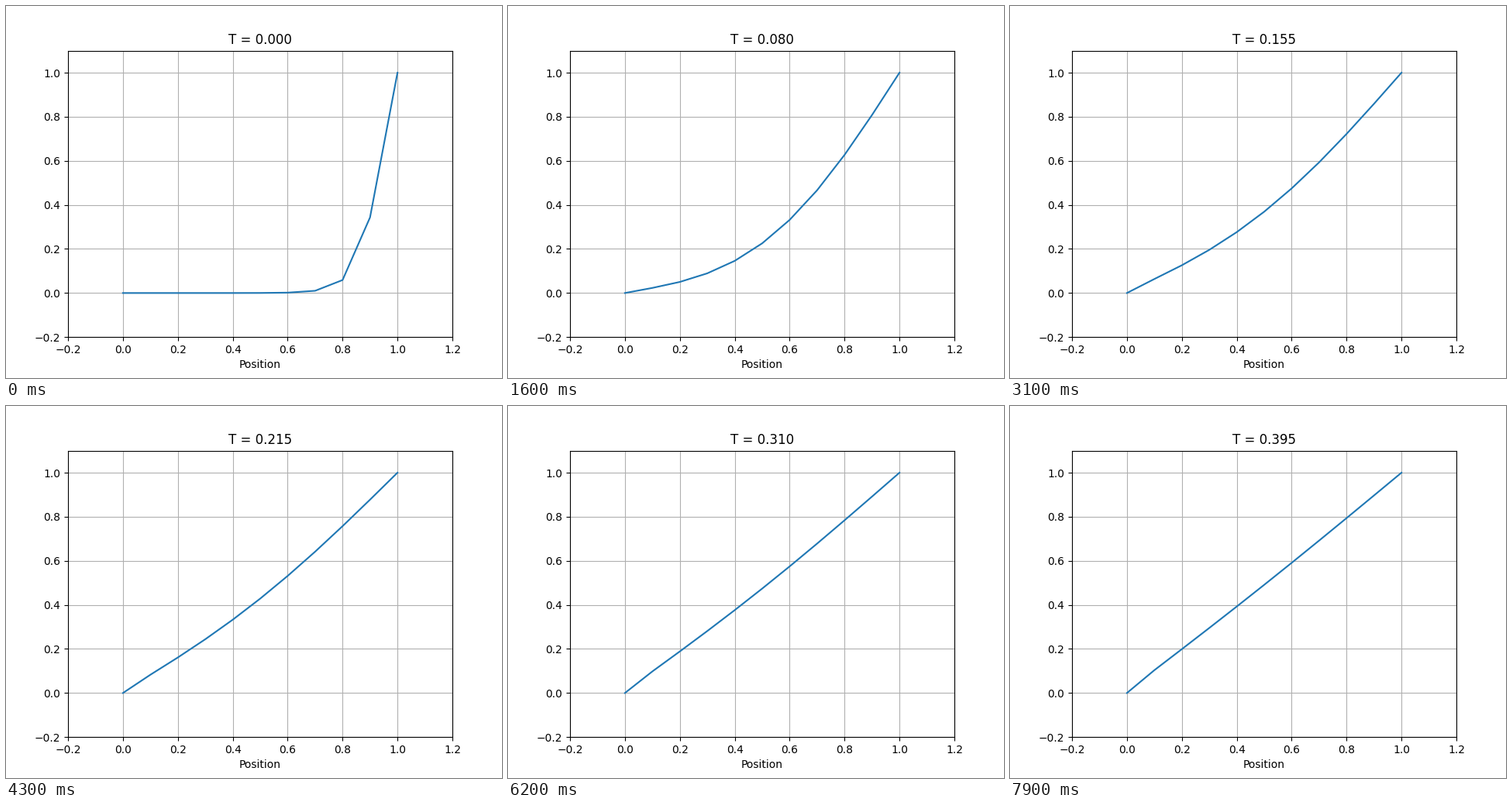
A matplotlib script that plays this animation: 640 px wide and 480 px high, repeating every 8000 ms.

```python
import numpy as np
import matplotlib.pyplot as plt
from matplotlib.animation import FuncAnimation

FRAMES, INTERVAL = 80, 100
DX, DT = 0.1, 0.005
R = DT / DX**2

x = np.linspace(0, 1, 11)
n = len(x)


def tridiag(side, mid):
    return mid * np.eye(n) + side * (np.eye(n, k=1) + np.eye(n, k=-1))


# Crank-Nicolson; only the right end is pinned inside the matrix
implicit = tridiag(-R / 2, 1 + R)
explicit = tridiag(R / 2, 1 - R)
implicit[-1] = np.eye(n)[-1]


def step(u):
    rhs = explicit @ u
    rhs[0], rhs[-1] = 0, 1
    new = np.linalg.solve(implicit, rhs)
    new[0], new[-1] = 0, 1
    return new


def solve():
    u = np.zeros(n)
    u[-1] = 1
    states = []
    for _ in range(FRAMES):
        u = step(u)
        states.append(u)
    return states


states = solve()

fig, ax = plt.subplots(figsize=(6.4, 4.8), dpi=100)
ax.set_xlim(-0.2, 1.2)
ax.set_ylim(-0.2, 1.1)
ax.set_xlabel("Position")
ax.grid(True)
line, = ax.plot(x, states[0])
title = ax.set_title("T = 0.000")


def update(i):
    line.set_ydata(states[i])
    title.set_text(f"T = {i * DT:.3f}")
    return line, title


anim = FuncAnimation(fig, update, frames=FRAMES, interval=INTERVAL,
                     repeat=True, repeat_delay=0, blit=False)
plt.show()
```
